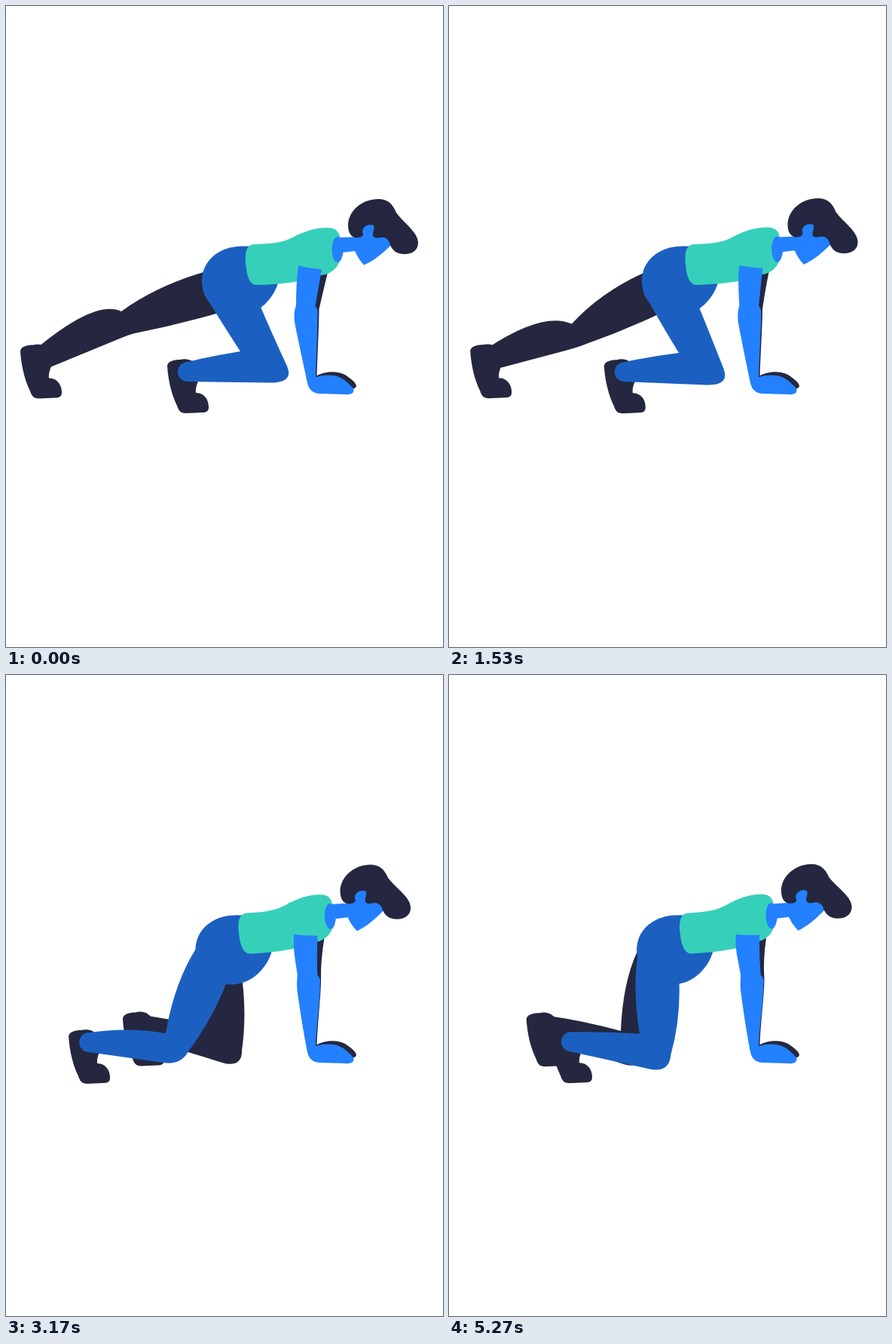
Write an HTML page that moves like this. It is 580 by 850 pixels and loops after 5310 ms.

```html
<!DOCTYPE html>
<html lang="en">
<head>
<meta charset="utf-8">
<title>Mountain climber</title>
<style>
  html, body { margin: 0; width: 100%; height: 100%; overflow: hidden; background: #fff; }
  svg { display: block; width: 580px; height: 850px; }
  .dark { fill: #24273f; }
  .skin { fill: #2380ff; }
  .pants { fill: #1b60c1; }
  .shirt { fill: #36d0ba; }
</style>
</head>
<body>
<svg viewBox="0 0 580 850">
  <defs>
    <path id="shoe" d="M-27,-8 C-26,-15 -16,-16 -10,-16 C-4,-18 4,-16 6,-14 C12,-10 16,-6 16,6
      C14,14 10,20 11,28 C22,28 28,37 28,47 C28,53 24,54 20,54 L-2,55 C-10,55 -12,51 -14,45
      C-22,29 -26,9 -27,-8Z"/>
  </defs>
  <use id="farShoe" href="#shoe" class="dark"/>
  <path id="farLeg" class="dark"/>
  <path id="farArm" class="dark"/>
  <path class="dark" d="M410,492 C420,484 440,483 450,489 C458,494 465,500 465,504 C464,507 461,508 459,507 L425,500Z"/>
  <use id="nearShoe" href="#shoe" class="dark"/>
  <path id="nearLeg" class="pants"/>
  <circle id="ankle" class="pants" r="13"/>
  <path id="pelvis" class="pants" d="M-50,0 C-50,-26 -28,-46 4,-46 L45,-46 L51,3 C46,20 28,46 -4,46 C-30,46 -50,26 -50,0Z"/>
  <g id="upper">
    <path class="shirt" d="M318,340 C317,325 320,316 330,316 C360,315 370,313 386,304 C400,298 410,294 427,294
      C437,294 442,299 443,306 L443,338 C438,351 428,356 418,357 C405,364 370,369 333,370 C322,370 319,355 318,340Z"/>
    <path class="skin" d="M441,307 L470,306 L470,288 L492,288 L512,300 L511,317 C500,328 488,338 475,343.500
      C470,338 466,332 463,325 C456,326 450,326 447,327Z"/>
    <ellipse class="skin" cx="440" cy="323" rx="7.500" ry="17"/>
    <path class="dark" d="M463,307 C456,305 454,298 454,290 C455,270 474,256 494,256 C508,256 514,264 518,274
      C528,288 547,300 547,314 C547,324 539,329 529,329 C518,329 513,324 510,317 C508,308 502,306 497,307
      C491,308 488,308 487,304 C486,300 490,296 488,291 C480,288 473,293 473,300 C476,304 472,308 463,307Z"/>
  </g>
  <path id="nearArm" class="skin"/>
</svg>
<script>
const LOOP = 5310, CYCLE = 1400, HALF = 700, SWING = 505;
const $ = id => document.getElementById(id);
const pt = p => p.map(v => v.toFixed(2)).join(',');
const move = (p, dx, dy) => [p[0] + dx, p[1] + dy];
const mid = (p, q) => [(p[0] + q[0]) / 2, (p[1] + q[1]) / 2];
const wave = x => Math.sin(Math.PI * x) ** 2;

// The point at distance d from p in the direction of q.
function toward(p, q, d) {
  const dx = q[0] - p[0], dy = q[1] - p[1], k = d / Math.hypot(dx, dy);
  return [p[0] + dx * k, p[1] + dy * k];
}

// u runs from knee forward (0) to leg stretched back (1);
// late is the final snap that opens the knee.
function drawLeg(leg, shoe, u, cx, far) {
  const late = u ** 5;
  const hip = [cx - 48, 379 - 26 * u];
  const groin = [cx + 20 - 34 * u - 7 * late, 380 + 25 * u];
  let pit = [311 - 137 * u - 19 * late, 458 + 45 * u - 85 * late];
  let cap = [383 - 215 * u, 500 + 86 * u - 139 * u ** 3.3];
  let ankle = [241 - 187 * u, 485 + 3 * u];
  if (far) {
    pit = move(pit, -2 - 9 * (1 - u) ** 3, -6 - 7 * late);
    cap = move(cap, -5, -11 * u * u);
    ankle = move(ankle, -3 - 5 * late, -22.5);
  }
  const end = far ? move(ankle, 0, 2.5) : ankle;
  const knee = mid(pit, cap), tip = toward(end, knee, far ? 15 : 13);
  const nx = tip[0] - end[0], ny = tip[1] - end[1];
  const top = move(end, ny, -nx), low = move(end, -ny, nx);

  const bend = move(mid(hip, pit), -9, -12 + 5 * late);
  const calf = move(mid(pit, end), 20 * late, -8 - 40 * late);
  const under = toward(cap, low, 34 - 17 * u);
  const front = toward(cap, groin, 25 - 17 * late);
  const thigh = move(mid(front, groin), 40 * u * (1 - u), 3);
  leg.setAttribute('d', `M${pt(hip)} Q${pt(bend)} ${pt(pit)} Q${pt(calf)} ${pt(top)} L${pt(low)}
    L${pt(under)} Q${pt(cap)} ${pt(front)} Q${pt(thigh)} ${pt(groin)} L${pt([cx, 355])}Z`);
  shoe.setAttribute('transform', `translate(${pt(ankle)})`);
  return ankle;
}

// Hands stay put; s slides the shoulder and b pushes the elbow.
function drawArms(s, b) {
  $('nearArm').setAttribute('d', `M${388 + s},344 Q${402 + s},${348 + s * .4} ${419 + s},${349 + s * .6}
    Q${414 + s * .3},378 ${410.5 + b * .8},398 Q${414.5 + b},402 ${413.5 + b * .9},410
    C${413.5 + b},430 412,465 411,492 C420,489 428,489 435,490 C447,492 453,499 461,507
    C463,513 458,516 450,515 L415,514 C406,513 402,508 400,500
    C396,480 ${388 + b * .6},445 ${383 + b},419 C${382 + b},408 ${383 + b},403 ${385 + b * .5},397
    C${385 + s * .3},375 ${386 + s},360 ${388 + s},344Z`);
  $('farArm').setAttribute('d', `M${412 + s},345 L${428 + s},349 Q${421 + s * .6},378 ${415.5 + b * .7},402
    C${415.5 + b * .8},422 413.5,460 412.5,492 L405,492 L405,400Z`);
}

function pose(t) {
  if (t > 4200) t = Math.max(4200, t - 33);  // the last cycle starts one beat late
  const c = t % CYCLE, p = Math.min(1, c % HALF / SWING);
  const swap = wave(p ** 1.48 / 2);   // legs trade places
  const sway = -12.4 * wave(p ** 1.2); // hips dip back early
  const lift = wave(p ** 1.48);       // chest and elbow follow
  const near = c < HALF ? swap : 1 - swap;
  const cx = 310 + sway;

  drawLeg($('farLeg'), $('farShoe'), 1 - near, cx, true);
  const ankle = drawLeg($('nearLeg'), $('nearShoe'), near, cx, false);
  $('ankle').setAttribute('transform', `translate(${pt(ankle)})`);
  $('pelvis').setAttribute('transform', `translate(${cx},364.5)`);
  $('upper').setAttribute('transform', `translate(${sway},0) rotate(${-1.75 * lift},320,365)`);
  drawArms(sway * .65, lift * 4.3);
}

// Thirty pictures a second, each starting on a 10 ms mark.
function tick() {
  const t = (performance.now() - start) % LOOP;
  const n = Math.min(158, Math.floor((t + 3.4) * .03));
  pose(Math.round(n * 10 / 3) * 10);
  requestAnimationFrame(tick);
}
const start = performance.now();
tick();
</script>
</body>
</html>
```
